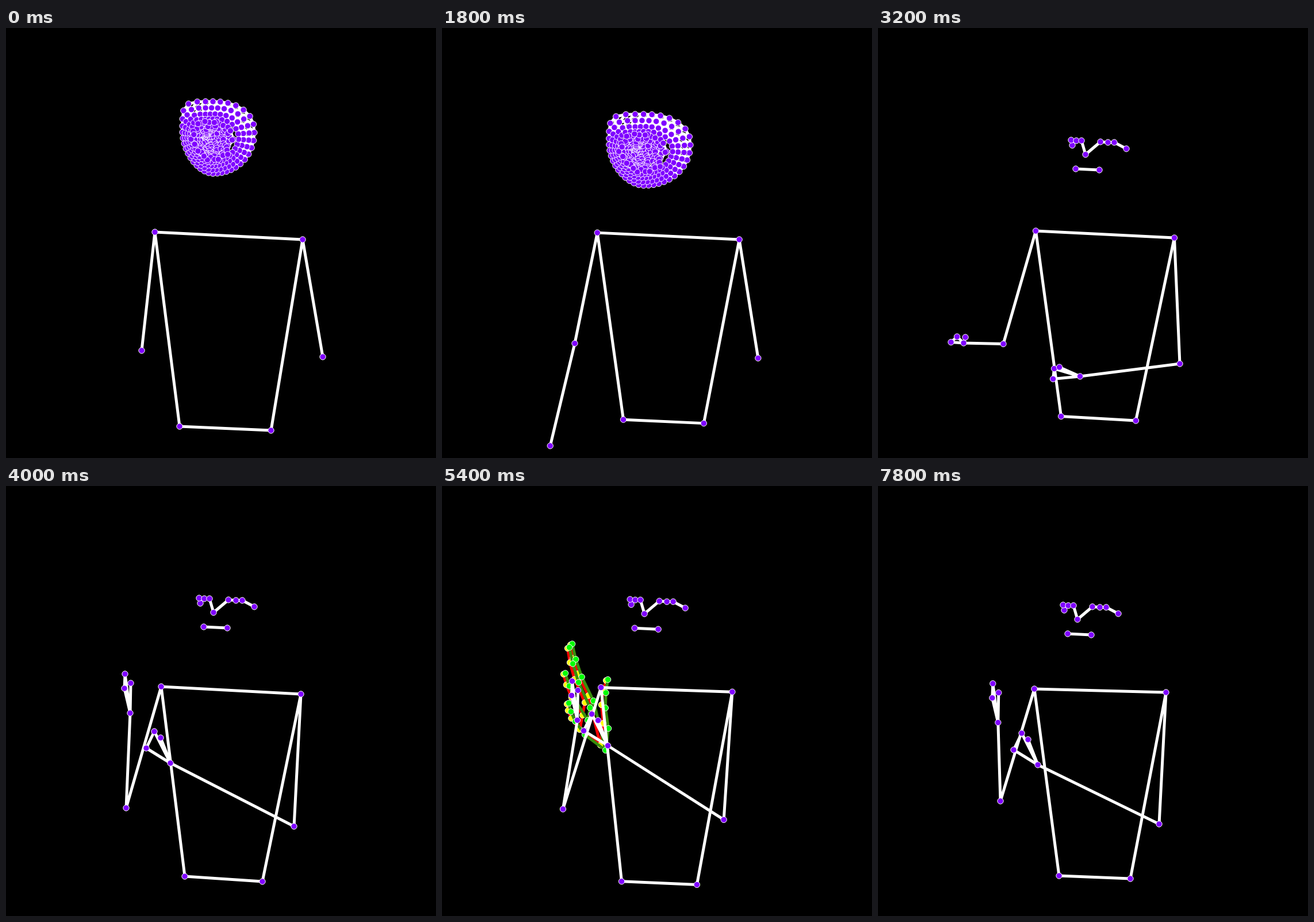
These frames come from a looping animation (748x748 px, 8000 ms). An HTML page with a canvas:

```html
<!DOCTYPE html>
<html lang="en">
<head>
<meta charset="utf-8">
<title>Pose tracking</title>
<style>
html, body { margin: 0; width: 100%; height: 100%; overflow: hidden; background: #000; }
canvas { display: block; width: 100vw; height: 100vh; object-fit: contain; }
</style>
</head>
<body>
<canvas id="stage" width="748" height="748"></canvas>
<script>
const SIZE = 748, LOOP = 8000, STEP = 200;
const DROP = 2400, FACE_LOST = 3000, RAISED = 4000, END = 7800;
const ctx = document.getElementById('stage').getContext('2d');
const { PI, sin, cos, abs, min, max, exp } = Math, TAU = PI * 2;

const clamp = u => min(1, max(0, u));
const smooth = u => u * u * (3 - 2 * u);
const lerp = (a, b, u) => a + (b - a) * u;
const mix = (a, b, u) => [lerp(a[0], b[0], u), lerp(a[1], b[1], u)];
const add = ([x, y], dx, dy) => [x + dx, y + dy];

// Eased progress of the three phases: arms sink, arms rise, waving,
// with a sideways sway and a short lift of the body while waving
function phases(t) {
  const u = clamp((t - RAISED) / (END - RAISED));
  return {
    sink: clamp(t / DROP) ** 2,
    rise: smooth(clamp((t - DROP) / (RAISED - DROP))),
    wave: u, sway: sin(TAU * u), bump: sin(PI * u)
  };
}

// A joint passes its places at 0, DROP, RAISED and END
const follow = ([a, b, c, d], p) =>
  p.wave ? mix(c, d, p.wave) : p.rise ? mix(b, c, p.rise) : mix(a, b, p.sink);

const joints = {
  shoulderL: [[259, 355], [279, 357], [270, 349], [272, 353]],
  shoulderR: [[516, 368], [518, 368], [513, 362], [501, 359]],
  elbowL: [[236, 561], [227, 539], [209, 560], [213, 548]],
  elbowR: [[551, 572], [549, 576], [501, 592], [489, 588]],
  hipL: [[302, 693], [326, 672], [311, 679], [315, 678]],
  hipR: [[461, 700], [451, 678], [446, 688], [439, 683]],
  wristL: [[222, 760], [162, 701], [216, 395], [209, 411]],
  wristR: [[480, 840], [417, 730], [286, 482], [278, 485]]
};

// Little finger, index finger and thumb, seen from the wrist
const hands = {
  hangL: [[-34, 40], [-14, 46], [5, 32]],
  lowL: [[-22, -7], [-20, -28], [-3, -27]],
  highL: [[-10, -43], [-9, -68], [1, -52]],
  hangR: [[-52, 35], [-62, 28], [-55, 12]],
  highR: [[-42, -26], [-28, -55], [-17, -44]]
};
const mixHand = (a, b, u) => a.map((p, i) => mix(p, b[i], u));

// The raised hand dips to the side at these moments
const dips = [4700, 6000, 6450, 7300];
const liftAt = t => 1 - min(1, dips.reduce((s, d) => s + exp(-(((t - d) / 220) ** 2)), 0));

function bodyPoints(t, p) {
  const j = {};
  for (const name in joints) j[name] = follow(joints[name], p);
  j.shoulderL = add(j.shoulderL, 8 * p.sway, 0);
  j.shoulderR = add(j.shoulderR, -5 * p.sway, -3 * p.bump);
  j.elbowL = add(j.elbowL, 0, 7 * p.bump);
  j.elbowR = add(j.elbowR, -7 * p.bump, -11 * p.bump);
  j.hipL = add(j.hipL, 0, 10 * p.bump);
  j.hipR = add(j.hipR, 0, 8 * p.bump);
  j.wristR = add(j.wristR, 6 * p.bump, -23 * p.bump - 14 * p.sway);

  let handL = mixHand(hands.hangL, hands.highL, p.rise);
  if (t > RAISED) {
    const lift = liftAt(t);
    const up = [7 - 11 * p.wave + 30 * p.sway, -165 + 28 * p.wave];
    j.wristL = add(j.elbowL, ...mix([-34, -58], up, lift));
    handL = mixHand(hands.lowL, hands.highL, lift);
  } else {
    j.wristL = add(j.wristL, -40 * sin(PI * p.rise), 0);
  }
  const handR = mixHand(hands.hangR, hands.highR, p.rise);
  return [
    j.shoulderL, j.shoulderR, j.elbowL, j.elbowR, j.hipL, j.hipR,
    j.wristL, ...handL.map(f => add(j.wristL, ...f)),
    j.wristR, ...handR.map(f => add(j.wristR, ...f))
  ];
}

const bodyLinks = [[0, 1], [0, 2], [1, 3], [0, 4], [1, 5], [4, 5]];
for (const [elbow, wrist] of [[2, 6], [3, 10]]) {
  bodyLinks.push([elbow, wrist], [wrist + 1, wrist + 2]);
  for (let f = 1; f < 4; f++) bodyLinks.push([wrist, wrist + f]);
}

// Ear, eye, nose, eye, ear, then the mouth corners, seen from the nose
const face = [
  [-23, -16], [-25, -25], [-16, -24], [-7, -24], [0, 0],
  [26, -22], [39, -21], [50, -21], [71, -10], [-17, 25], [24, 27]
];
const faceLinks = [[9, 10]];
for (let i = 0; i < 8; i++) faceLinks.push([i, i + 1]);

function facePoints(p) {
  const nose = add(mix([361, 220], [347, 232], p.wave), -5 * p.sway, -3 * p.sway);
  return face.map(f => add(nose, ...f));
}

// Lines first, dots on top; points below the stage are dropped with their lines
function draw(points, links, dotColor = '#7f00ff', lineColor = '#fff') {
  const inside = q => q[1] < SIZE;
  ctx.lineWidth = 5;
  ctx.strokeStyle = lineColor;
  ctx.beginPath();
  for (const [i, j] of links) {
    if (!inside(points[i]) || !inside(points[j])) continue;
    ctx.moveTo(...points[i]);
    ctx.lineTo(...points[j]);
  }
  ctx.stroke();
  ctx.lineWidth = 1;
  ctx.strokeStyle = '#fff';
  ctx.fillStyle = dotColor;
  for (const q of points.filter(inside)) {
    ctx.beginPath();
    ctx.arc(q[0], q[1], 5.2, 0, TAU);
    ctx.fill();
    ctx.stroke();
  }
}

function seeded(seed) {
  return () => (seed = (seed * 16807) % 2147483647) / 2147483647;
}

// Outline of the turned head: each quarter is its own superellipse
function rim(phi) {
  const a = phi + .4 * cos(phi), c = cos(a), s = sin(a);
  const n = s < 0 ? (c < 0 ? 5 : 2.2) : (c < 0 ? 1.8 : 2.1);
  const rx = c < 0 ? 53 : 72, ry = s < 0 ? 52 : 73;
  const r = (abs(c / rx) ** n + abs(s / ry) ** n) ** (-1 / n);
  return [360 + r * c, 180 + r * s];
}

// Face mesh: regular rings outside, a crowded middle, a sparse cheek
function buildMesh() {
  const nose = [347, 189], cheek = [400, 194], count = 36, inner = 230;
  const points = [], links = [], random = seeded(7);
  const put = (phi, scale) => {
    const [x, y] = rim(phi), dx = x - nose[0], dy = y - nose[1];
    const k = scale ** (1 + .9 * max(0, -dy / Math.hypot(dx, dy)));
    return points.push(mix(nose, [x, y], k)) - 1;
  };
  [1, .9, .79, .69].forEach((scale, r) => {
    for (let i = 0; i < count; i++) {
      const id = put(i / count * TAU, scale), next = r * count + (i + 1) % count;
      links.push([id, next]);
      if (r) links.push([id, id - count], [id, next - count]);
    }
  });
  const first = points.length;
  for (let i = 0; i < inner; i++) {
    const id = put(i * 2.39996, .62 * Math.sqrt(i / inner));
    const q = points[id] = add(points[id], random() * 6 - 3, random() * 6 - 3);
    const near = Math.hypot(q[0] - cheek[0], q[1] - cheek[1]) < 16;
    if (near && random() < .75) points[id] = points[id - 21];
    for (const d of [13, 21]) if (id - d >= first) links.push([id, id - d]);
  }
  return { points, links };
}
const mesh = buildMesh();

// The head turns to the front and back while it sinks
function meshPoints(t) {
  const u = clamp(t / DROP), turn = sin(PI * u);
  const x0 = 307 - 23 * turn, y0 = 128 + 43 * u * u - 3 * turn;
  const w = 1 + .184 * turn, h = 1 - .096 * u + .088 * turn;
  return mesh.points.map(([x, y]) => [x0 + (x - 307) * w, y0 + (y - 128) * h]);
}

// Detailed hand, seen from the wrist: knuckle and tip of each finger
const fingers = [
  [[5, -38], [4, -123]], [[-21, -86], [-58, -185]], [[-27, -74], [-63, -179]],
  [[-31, -52], [-70, -134]], [[-36, -27], [-64, -82]]
];
const palm = [[0, 0]], palmLinks = [[0, 1], [0, 5], [0, 17], [5, 9], [9, 13], [13, 17]];
for (const [knuckle, tip] of fingers) {
  [0, .42, .73, 1].forEach((u, j) => {
    const id = palm.push(add(mix(knuckle, tip, u), -5 * sin(PI * u), 0)) - 1;
    if (j) palmLinks.push([id - 1, id]);
  });
}

// Both trackers see the same hand, the second one slightly beside
function drawPalms([wx, wy]) {
  const green = palm.map(q => add(q, wx - 4, wy + 8));
  const yellow = green.map((q, i) => {
    const joint = i ? (i - 1) % 4 : 0;
    return add(q, 2 * joint - 9, 3.5 * joint - 9);
  });
  draw(yellow, palmLinks, '#ffff00', '#ff0000');
  draw(green, palmLinks, '#00ff00', '#388e0c');
}

function render(t) {
  const p = phases(t), body = bodyPoints(t, p);
  ctx.fillStyle = '#000';
  ctx.fillRect(0, 0, SIZE, SIZE);
  if (t >= 5200 && t < 5600) drawPalms(body[10]);
  if (t < FACE_LOST) draw(meshPoints(t), mesh.links);
  else draw(facePoints(p), faceLinks);
  draw(body, bodyLinks);
}

const start = performance.now();
function tick() {
  const t = (performance.now() - start) % LOOP;
  render(Math.floor(t / STEP) * STEP);
  requestAnimationFrame(tick);
}
tick();
</script>
</body>
</html>
```
